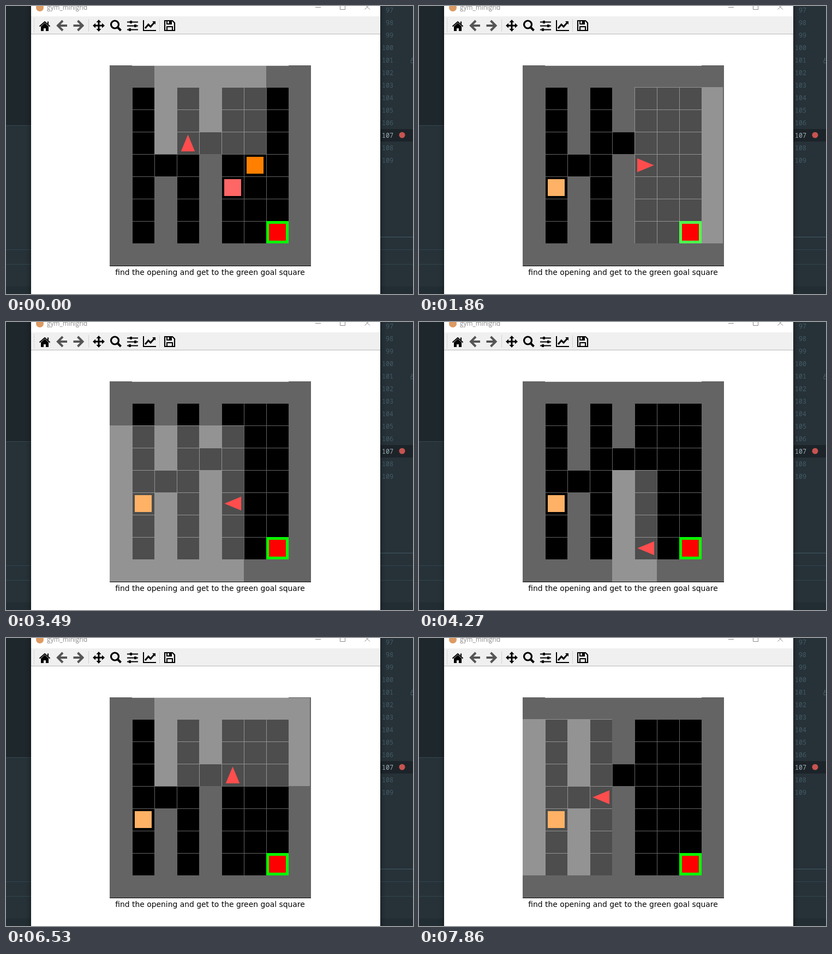
An HTML page with a canvas that plays this animation: 746 by 529 pixels, repeating every 8 s.

```html
<!DOCTYPE html>
<html lang="en">
<head>
<meta charset="utf-8">
<title>Grid world</title>
<style>
html, body { margin: 0; width: 746px; height: 529px; overflow: hidden; background: #263238; }
svg, canvas { position: absolute; left: 0; top: 0; }
.nums { font: 11.7px "Noto Sans Mono", monospace; fill: #465a64; text-anchor: end; }
</style>
</head>
<body>
<svg width="746" height="529">
  <!-- editor behind the window -->
  <rect width="46" height="219" fill="#1e272c"/>
  <path d="M0 219.5H46M0 447.5H46M0 474.5H46M686 424.5H746M686 447.5H746M686 474.5H746" stroke="#34454e"/>
  <path d="M686 424.5H746" stroke="#465a64"/>
  <rect y="515" width="746" height="14" fill="#222d33"/>
  <rect x="686" y="226" width="60" height="23" fill="#1c2429"/>
  <g id="nums" class="nums"></g>
  <circle cx="726" cy="237" r="5.5" fill="#c75450"/>
  <path d="M746 99.5h-4v5h4M743.500 99v-3h2.500" fill="none" stroke="#465a64"/>

  <!-- window -->
  <rect x="46" y="-9" width="640" height="560" fill="#fff" style="filter:drop-shadow(0 0 5px #0008)"/>
  <circle cx="62" cy="3" r="7" fill="#dd9a62"/>
  <text x="75" y="7" font-family="Open Sans, sans-serif" font-size="11.8" fill="#8a8a8a">gym_minigrid</text>
  <path d="M567 2.500h10M612.500 -3v9.500h9V-3M657.500 -3l9.500 9.500M667 -3l-9.500 9.500" fill="none" stroke="#8a8a8a"/>
  <rect x="46" y="19" width="640" height="32" fill="#f0f0f0"/>
  <path d="M46 51.500H686" stroke="#b8b8b8"/>
  <path d="M51.500 23V48" stroke="#aaa" stroke-dasharray="1 2"/>
  <path d="M151.500 24V47M281.500 24V47" stroke="#d2d2d2"/>

  <!-- toolbar icons -->
  <path d="M71 31l-7 6.500V46h5v-5h4v5h5v-8.500z"/>
  <path d="M61.500 37.500L71 29l9.500 8.500M77 28.500v5" fill="none" stroke="#000" stroke-width="2"/>
  <g fill="none" stroke="#555" stroke-width="4">
    <path id="arrow" d="M112 36H96M104 27l-9 9 9 9"/>
    <use href="#arrow" transform="matrix(-1 0 0 1 235.500 0)"/>
  </g>
  <path d="M170 28v16M162 36h16" stroke="#000" stroke-width="3"/>
  <path d="M170 25l4.500 5h-9zM170 47l4.500-5h-9zM159 36l5-4.500v9zM181 36l-5-4.500v9z"/>
  <g fill="none" stroke="#000">
    <circle cx="199.500" cy="34" r="7" stroke-width="3.200"/>
    <path d="M204.500 39l6 6" stroke-width="4"/>
    <path d="M222 29.500h20M222 36.500h20M222 43.500h20" stroke-width="2"/>
    <path d="M229 27v5M237 34v5M227 41v5" stroke-width="4"/>
    <path d="M252 26v19h23" stroke-width="2"/>
    <path d="M255 41l6-7 4 4 8-9" stroke-width="3"/>
    <path d="M291 27h14l4 4v14h-18z" stroke-width="2.200"/>
    <path d="M295 45v-7h10v7M295 27v6h8v-6" stroke-width="2"/>
  </g>
  <path d="M268 28h6v6zM299 28h3v4h-3z"/>

  <!-- frame of the plot -->
  <rect x="190" y="109" width="369" height="368" fill="#646464"/>
  <rect x="231" y="109" width="287" height="1" fill="#ddd"/>
  <rect x="190" y="477" width="369" height="1"/>
  <text x="374" y="494" font-family="DejaVu Sans, sans-serif" font-size="13.890" text-anchor="middle">find the opening and get to the green goal square</text>
</svg>
<canvas id="view" width="746" height="529"></canvas>
<script>
const LOOP = 8000, N = 9, CELL = 41, LEFT = 190, TOP = 108;
const DIRS = [[1, 0], [0, 1], [-1, 0], [0, -1]];
const MOVES = 'RFFFRFRRR' + 'RFRFRFRFFRFRRRRR' + 'FRRRRFLFRRRRFR' +
              'RFRRRRRRRR' + 'FRRRRFRRRRF' + 'RRRFFLFRRRRR';
// [first step, last step, number of steps]
const RUNS = [[70, 1090, 10], [1240, 2170, 10], [2320, 2710, 5], [2860, 3250, 5], [3420, 4350, 10],
              [4500, 5430, 10], [5580, 6530, 10], [6700, 7630, 10], [7780, 7860, 2]];
const SHORT = 80, SWITCH = 14;
const ctx = document.getElementById('view').getContext('2d');

for (let n = 97; n < 110; n++)
  nums.innerHTML += `<text x="710" y="${12 + (n - 97) * 23}"${n == 107 ? ' fill="#9fb0b8" style="fill:#9fb0b8"' : ''}>${n}</text>`;

// steps alternate between a short and a long wait
const times = [0];
for (const [from, to, n] of RUNS) {
  const longs = Math.floor((n - 1) / 2), shorts = n - 1 - longs;
  const long = (to - from - SHORT * shorts) / Math.max(1, longs);
  for (let i = 0; i < n; i++) times.push(from + Math.ceil(i / 2) * SHORT + Math.floor(i / 2) * long);
}

const poses = [{ x: 3, y: 3, dir: 3 }];
for (const move of MOVES) {
  const { x, y, dir } = poses[poses.length - 1];
  const [dx, dy] = DIRS[dir];
  poses.push(move == 'F' ? { x: x + dx, y: y + dy, dir }
                         : { x, y, dir: (dir + (move == 'R' ? 1 : 3)) % 4 });
}

function isWall(x, y) {
  if (x < 1 || y < 1 || x > 7 || y > 7) return true;
  return x == 2 && y != 4 || x == 4 && y != 3;
}

// cells the agent sees in the 7 by 7 area ahead; walls block the view
function visible({ x, y, dir }) {
  const [fx, fy] = DIRS[dir], [rx, ry] = DIRS[(dir + 1) % 4];
  const at = (s, d) => [x + rx * (s - 3) + fx * d, y + ry * (s - 3) + fy * d];
  const seen = Array.from({ length: 8 }, () => []);
  const cells = [];
  const spread = (s, d, side) => {
    if (!seen[d][s] || isWall(...at(s, d))) return;
    seen[d][s + side] = seen[d + 1][s] = seen[d + 1][s + side] = true;
  };
  seen[0][3] = true;
  for (let d = 0; d < 7; d++) {
    for (let s = 0; s < 6; s++) spread(s, d, 1);
    for (let s = 6; s > 0; s--) spread(s, d, -1);
    for (let s = 0; s < 7; s++) if (seen[d][s]) cells.push(at(s, d));
  }
  return cells;
}

function box(x, y, color, pad = 0, size = CELL) {
  ctx.fillStyle = color;
  ctx.fillRect(LEFT + x * CELL + pad, TOP + y * CELL + pad, size, size);
}

const mark = (x, y, color) => box(x, y, color, 5, 31);

function drawAgent({ x, y, dir }) {
  ctx.save();
  ctx.translate(LEFT + (x + .5) * CELL, TOP + (y + .5) * CELL);
  ctx.rotate(dir * Math.PI / 2);
  ctx.scale(CELL, CELL);
  ctx.fillStyle = '#f00';
  ctx.beginPath();
  ctx.moveTo(-.38, -.31);
  ctx.lineTo(.37, 0);
  ctx.lineTo(-.38, .31);
  ctx.fill();
  ctx.restore();
}

function draw(step) {
  const pose = poses[step];
  for (let y = 0; y < N; y++)
    for (let x = 0; x < N; x++) {
      box(x, y, '#646464');
      if (!isWall(x, y)) box(x, y, '#000', 1, CELL - 1);
    }
  box(7, 7, '#0f0');
  drawAgent(pose);
  for (const [x, y] of visible(pose))
    if (x >= 0 && y >= 0 && x < N && y < N) box(x, y, 'rgba(255,255,255,.3)');
  mark(7, 7, '#f00');
  if (step < SWITCH) {
    mark(5, 5, '#f66');
    mark(6, 4, '#ff8000');
  } else mark(1, 5, '#ffb266');
}

ctx.beginPath();
ctx.rect(190, 110, 367, 367);
ctx.clip();

let shown = -1;
const start = performance.now();
function tick() {
  const t = (performance.now() - start) % LOOP;
  const step = times.filter(at => at <= t + .01).length - 1;
  if (step != shown) draw(shown = step);
  requestAnimationFrame(tick);
}
tick();
</script>
</body>
</html>
```
